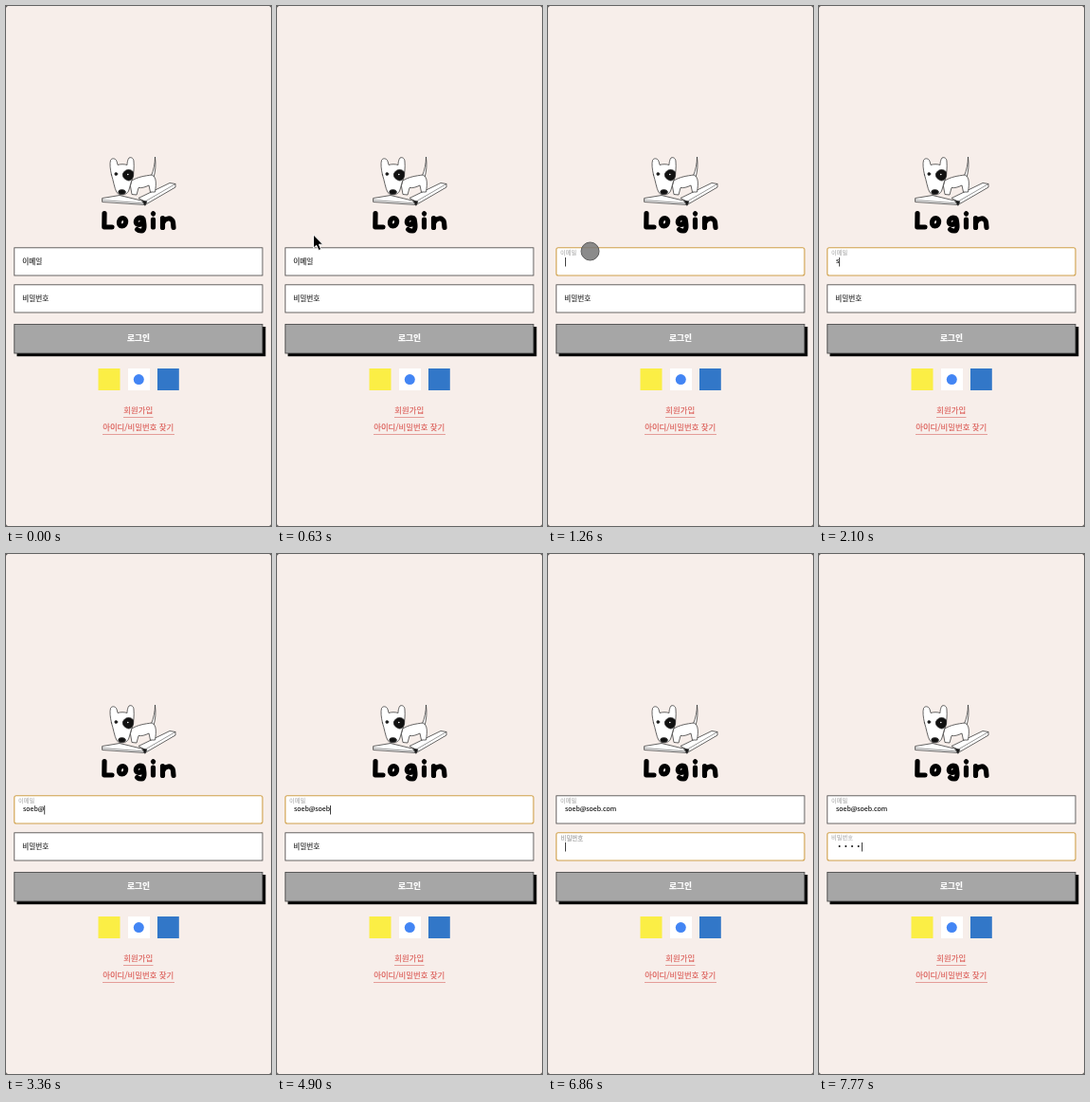
An HTML page that plays this animation: 280 by 548 pixels, repeating every 8000 ms.

```html
<!DOCTYPE html>
<html lang="ko">
<head>
<meta charset="utf-8">
<title>Login</title>
<style>
  html, body { margin: 0; width: 100%; height: 100%; overflow: hidden; background: #4a4644; }
  svg { display: block; width: 100%; height: 100%; }
  text { font-family: "Noto Sans CJK KR", "Noto Sans CJK", "Noto Sans", sans-serif; white-space: pre; }
  .box { fill: #fff; stroke: #4d4a4a; stroke-width: .85; }
  .focus { stroke: #d0a04a; stroke-width: 1.1; }
  .label { font-size: 7.6px; font-weight: 500; stroke-width: .15; }
  .value { font-size: 7px; fill: #111; stroke: #111; stroke-width: .12; }
  .submit { font-size: 8.7px; font-weight: 700; fill: #fff; stroke: #fff; stroke-width: .25; text-anchor: middle; }
  .link { font-size: 8.4px; fill: #db5954; stroke: #db5954; stroke-width: .12; text-anchor: middle; }
  .ink { fill: #fff; stroke: #333; stroke-width: .75; stroke-linejoin: round; stroke-linecap: round; }
  .brush { fill: none; stroke: #000; stroke-width: 5.2; stroke-linecap: round; stroke-linejoin: round; }
</style>
</head>
<body>
<svg viewBox="0 0 280 548">
  <rect width="280" height="548" rx="2.5" fill="#f7eeea"/>

  <g id="dog" class="ink">
    <path d="M102 202.500 L120 199.500 L147 206 L147 209.500 L102 206.500 Z"/>
    <path d="M102 204.500 L147 208" stroke-width=".5"/>
    <path d="M147 206 L140 202.500 L173 186.500 L179 187.500 L179 191 L147 209.500 Z"/>
    <path d="M147 206 L179 187.500" stroke-width=".5"/>
    <path d="M153.500 179 C156 173 157.500 166 157.500 159 C158.500 167 158 174 156 181 Z"/>
    <path d="M133 184 C139 180 147 179 154 178 C159 180 159 187 157.500 196 L152.500 196 L151 189 C147 191 143 192 140 191.500 L138 199 L133 198.500 L131.500 190 Z"/>
    <path d="M111.500 178 C110 172 109.500 166 110.500 162.500 C112 160 115 160.500 116.500 162.500 C117.500 164 117.500 166 118 167.500 C121 166.500 125 166.500 128 167.500 C128 165 128.500 162 130 160 C132.500 159 135 160.500 135 164 C135.500 170 135 176 133.500 182 C131.500 187 131 191 129.500 195 C127.500 199.500 120 200 117 196.500 C114.500 192 113.500 184 111.500 178 Z"/>
    <path d="M123.500 177 C125 171.500 132 171 134.500 175 C135.500 180 133 184.500 129 184 C126 183 122.500 180.500 123.500 177 Z" fill="#111"/>
    <circle cx="116.300" cy="177" r="1.500" fill="#111"/>
    <circle cx="128.800" cy="177.500" r=".8" stroke="none"/>
    <ellipse cx="122.500" cy="196" rx="3.800" ry="2.500" fill="#111"/>
    <path d="M144 205.500 L149 206 L147 210 Z" fill="#111"/>
  </g>

  <g class="brush">
    <path d="M104 218.500 L103.800 232.800 L112 233"/>
    <path d="M123.500 223.500 C118.500 223.500 118 232 122.500 232 C127.500 232 128 223.500 123.500 223.500"/>
    <path d="M144 223.500 C136.500 221.500 135.500 230.500 140 230.500 C143.500 230.500 144.500 226.500 145 224.500 C146.500 232 146.500 237 143 237 C141 237 139.500 236.500 138.500 235.500"/>
    <path d="M155.500 225 L155.500 233 M155.500 218.800 L155.600 218.900"/>
    <path d="M165.500 223.500 L165.500 233.500 M165.500 229 C167.500 223 175.500 222 176.500 228 L177 233.500"/>
  </g>

  <g id="fields"></g>

  <rect x="11.500" y="338" width="262.800" height="31.200" fill="#000"/>
  <rect x="8.800" y="335.400" width="262.200" height="30.600" fill="#a6a6a6" stroke="#444" stroke-width=".85"/>
  <text class="submit" x="140" y="353.400">로그인</text>

  <rect x="97.500" y="382" width="23" height="23" fill="#fbee45"/>
  <rect x="129" y="382" width="23" height="23" fill="#fff"/>
  <circle cx="140.300" cy="393.600" r="5.500" fill="#4285f4"/>
  <rect x="160" y="382" width="22.800" height="23" fill="#3277c8"/>

  <text class="link" x="139.700" y="429.200">회원가입</text>
  <text class="link" x="139.700" y="447.200">아이디/비밀번호 찾기</text>
  <path d="M124 433.500 H155.500 M102 451.500 H178" stroke="#e08a85" stroke-width=".8"/>

  <circle id="touch" cx="44.500" cy="258.500" r="9.500" fill="#777" fill-opacity=".85" stroke="#5c5c5c"/>
  <path id="cursor" d="M0 0 V14 L3.200 11.200 L5.500 16.500 L8 15.400 L5.800 10.200 H10 Z" fill="#000" stroke="#fff" stroke-width=".9"/>
</svg>

<script>
const LOOP = 8000, STEP = 70;
const EMAIL = 'soeb@soeb.com';
const EMAIL_KEYS = [2100, 2240, 2450, 2730, 3360, 4340, 4480, 4620, 4900, 5950, 6370, 6440, 6650];
const PASS_KEYS = [7490, 7630, 7770, 7770];
const EMAIL_FOCUS = 1050, PASS_FOCUS = 6790;
const PATH = [
  [70, 107, 483], [140, 78, 400], [210, 28, 252], [280, 5, 189], [420, 5, 189],
  [490, 10, 197], [630, 38.5, 241], [840, 43, 254], [980, 44, 257]
];

const $ = id => document.getElementById(id);
const clamp = v => Math.max(0, Math.min(1, v));
const mix = (a, b, p) => a + (b - a) * p;
const easeOut = p => 1 - (1 - p) ** 3;
const show = (el, on) => el.setAttribute('visibility', on ? 'visible' : 'hidden');
const typed = (keys, t) => keys.filter(k => k <= t).length;

function add(parent, tag, attrs, text = '') {
  const el = document.createElementNS('http://www.w3.org/2000/svg', tag);
  for (const k in attrs) el.setAttribute(k, attrs[k]);
  el.textContent = text;
  return parent.appendChild(el);
}

function makeField(y, name) {
  const g = add($('fields'), 'g', { transform: `translate(0 ${y})` });
  return {
    box: add(g, 'rect', { class: 'box', x: 8.8, y: .8, width: 262.2, height: 29.2 }),
    label: add(g, 'text', { class: 'label' }, name),
    value: add(g, 'text', { class: 'value', x: 18, y: 17.2 }),
    dots: add(g, 'g', { fill: '#111' }),
    caret: add(g, 'rect', { y: 11, width: .8, height: 9.5, fill: '#111' }),
    spell: add(g, 'path', { stroke: '#bf3f3a', 'stroke-width': 1.3, 'stroke-dasharray': '1.3 .8' })
  };
}

const email = makeField(254, '이메일');
const pass = makeField(293, '비밀번호');
for (let i = 0; i < PASS_KEYS.length; i++)
  add(pass.dots, 'circle', { cx: 21.6 + i * 6.7, cy: 15, r: 1 });

function drawField(f, t, start, focused, caretX) {
  const up = t < start ? 0 : easeOut(clamp((t - start + STEP) / 280));
  const shade = Math.round(mix(40, 178, up));
  const color = `rgb(${shade},${shade},${shade})`;
  f.box.setAttribute('class', focused ? 'box focus' : 'box');
  f.box.setAttribute('rx', focused ? 2 : 0);
  f.label.setAttribute('transform',
    `translate(${mix(17.3, 13, up)} ${mix(17.7, 8.3, up)}) scale(${mix(1, .82, up)})`);
  f.label.setAttribute('fill', color);
  f.label.setAttribute('stroke', color);
  show(f.caret, focused && t >= start + STEP);
  f.caret.setAttribute('x', caretX);
}

function cursorAt(t) {
  if (t >= 1400 && t < 1470) return [268, 229];
  if (t < PATH[0][0] || t >= EMAIL_FOCUS) return null;
  const i = PATH.findIndex(k => k[0] > t);
  if (i < 0) return PATH.at(-1).slice(1);
  const [t0, x0, y0] = PATH[i - 1], [t1, x1, y1] = PATH[i];
  const p = (t - t0) / (t1 - t0);
  return [mix(x0, x1, p), mix(y0, y1, p)];
}

function draw(t) {
  const n = typed(EMAIL_KEYS, t), m = typed(PASS_KEYS, t);
  const inEmail = t >= EMAIL_FOCUS && t < PASS_FOCUS;

  email.value.textContent = EMAIL.slice(0, n);
  const width = n ? email.value.getComputedTextLength() : 0;
  drawField(email, t, EMAIL_FOCUS, inEmail, 18 + width);
  drawField(pass, t, PASS_FOCUS, t >= PASS_FOCUS, 18.2 + m * 6.7);
  [...pass.dots.children].forEach((dot, i) => show(dot, i < m));

  show(email.spell, inEmail && t >= 6020);
  if (n > 9) email.spell.setAttribute('d', `M18 19 H${18 + email.value.getSubStringLength(0, 9)}`);

  const at = cursorAt(t);
  show($('cursor'), at);
  if (at) $('cursor').setAttribute('transform', `translate(${at})`);
  show($('touch'), t >= EMAIL_FOCUS && t < 1400);
}

const begin = performance.now();
function tick() {
  const t = (performance.now() - begin) % LOOP;
  draw(Math.floor(t / STEP) * STEP);
  requestAnimationFrame(tick);
}
tick();
</script>
</body>
</html>
```
